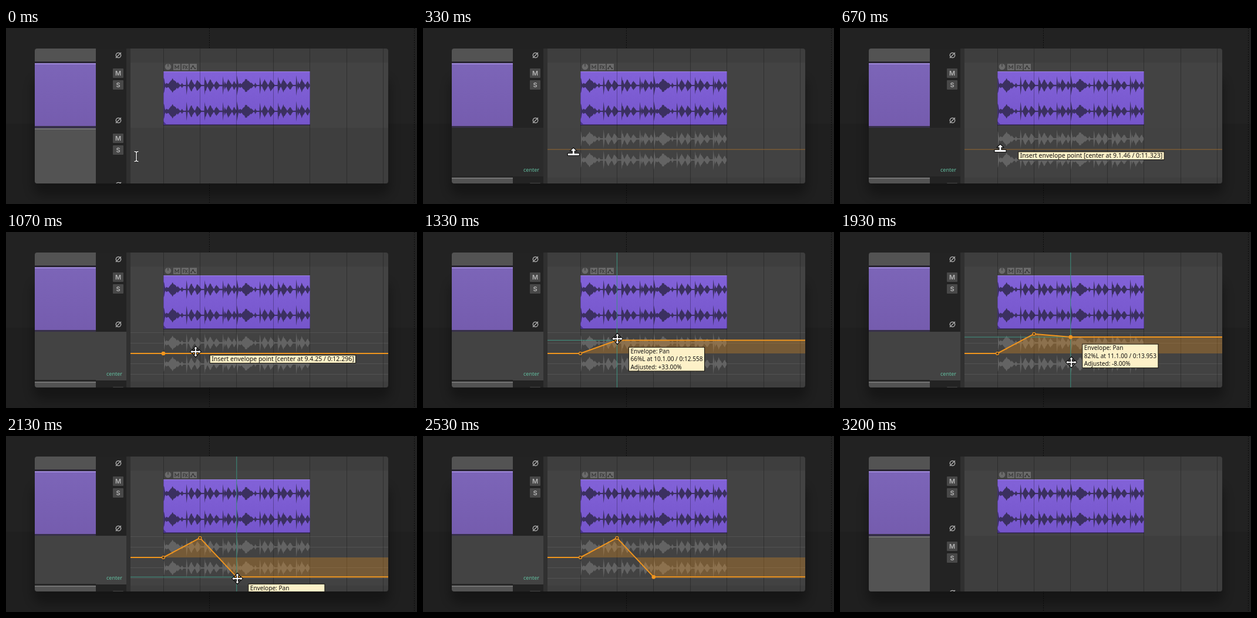
These frames come from a looping animation (700 px wide and 300 px high, 4.53 s). An HTML page:

```html
<!DOCTYPE html>
<html lang="en">
<head>
<meta charset="utf-8">
<title>Pan envelope</title>
<style>
  html, body { margin: 0; width: 100%; height: 100%; overflow: hidden; background: #212121; }
  svg { display: block; width: 100%; height: 100%; }
  text { font-family: "Noto Sans", "Open Sans", sans-serif; }
  .btn text { font: 600 11px Inter, sans-serif; fill: #b4b4b4; text-anchor: middle; }
  .btn rect { fill: #484848; }
  .phase { fill: none; stroke: #b4b4b4; stroke-width: 1.3; }
  .ptr { fill: #fff; stroke: #111; stroke-width: 1.2; stroke-linejoin: round; }
  .snap { stroke: #3f9683; stroke-width: 1; }
  .tip rect { fill: #fdf1c8; stroke: #15130c; }
  .tip text { fill: #111; font-weight: 500; }
</style>
</head>
<body>
<svg viewBox="0 0 700 300" preserveAspectRatio="none">
  <defs>
    <clipPath id="panel"><rect x="49" y="35" width="602" height="230" rx="4"/></clipPath>
    <filter id="blur" x="-20%" y="-20%" width="140%" height="150%"><feGaussianBlur stdDeviation="9"/></filter>
    <linearGradient id="clipFill" x1="0" y1="0" x2="0" y2="1">
      <stop offset="0" stop-color="#8262d8"/><stop offset="1" stop-color="#7555cb"/>
    </linearGradient>
    <linearGradient id="trackFill" x1="0" y1="0" x2="0" y2="1">
      <stop offset="0" stop-color="#7c65b8"/><stop offset="1" stop-color="#755cae"/>
    </linearGradient>
    <g id="phase" class="phase"><circle r="4.2"/><path d="M-4.5 4.5L4.5 -4.5"/></g>
    <g id="buttons" class="btn">
      <rect x="182" y="69" width="18" height="16" rx="1"/><text x="191" y="81">M</text>
      <rect x="182" y="89" width="18" height="16" rx="1"/><text x="191" y="101">S</text>
    </g>
  </defs>

  <rect width="700" height="300" fill="#222"/>
  <rect y="163" width="700" height="137" fill="#1f1f1f"/>
  <path d="M346.5 0V300M695.5 0V300" stroke="#0c0c0c" stroke-dasharray="2 2"/>
  <rect x="46" y="85" width="608" height="200" rx="16" fill="#000" opacity=".3" filter="url(#blur)"/>

  <g clip-path="url(#panel)">
    <rect x="49" y="35" width="163" height="230" fill="#232323"/>
    <rect x="205" y="35" width="7" height="230" fill="#303030"/>
    <rect x="212" y="35" width="439" height="230" fill="#3e3e3e"/>
    <rect x="212" y="59" width="439" height="111" fill="#434343"/>

    <rect x="49" y="35" width="104" height="22" fill="#535353"/>
    <rect x="49" y="57" width="104" height="3" fill="#292532"/>
    <rect x="49" y="60" width="104" height="107" fill="url(#trackFill)"/>
    <rect x="49" y="60" width="104" height="2" fill="#a08adb"/>
    <rect x="49" y="167" width="104" height="4" fill="#37304a"/>
    <use href="#phase" x="191.5" y="46.5"/>
    <use href="#buttons"/>
    <use href="#phase" x="191.5" y="157.5"/>

    <g id="next">
      <rect x="49" y="171" width="104" height="110" fill="#535353"/>
      <rect x="49" y="171" width="104" height="2" fill="#747474"/>
      <use href="#buttons" y="111"/>
      <use href="#phase" x="191.5" y="267.5"/>
    </g>

    <g id="lane">
      <rect id="head" x="49" y="170" width="156" height="83"/>
      <rect x="49" y="252" width="104" height="3" fill="#262626"/>
      <rect x="212" y="170" width="439" height="85" fill="#424242"/>
      <path id="rules" d="M212 171.5H651M212 189.5H651M212 224.5H651M212 242.5H651" stroke="#525252"/>
      <text x="198" y="245" font-size="9" fill="#62bfa0" text-anchor="end">center</text>
    </g>

    <g fill="#6a6a6a">
      <circle cx="276" cy="66" r="5.3"/>
      <path d="M285 61h12v11h-12zM299 61h12v11h-12zM313 61h12v11h-12z"/>
      <g fill="none" stroke="#3a3a3a" stroke-width="1.2">
        <path d="M288 70v-6l3 4 3 -4v6M305 64h-3v6M302 67h2.500M305 64l4 6M309 64l-4 6M315 69l3 -4 4 4"/>
        <path d="M276 66V61"/>
      </g>
      <g fill="#3a3a3a"><circle cx="315.500" cy="69" r="1.300"/><circle cx="318.500" cy="65" r="1.500"/><circle cx="322" cy="69" r="1.300"/></g>
    </g>
    <rect x="268" y="74" width="250" height="91" fill="url(#clipFill)"/>
    <rect x="268" y="74" width="250" height="1" fill="#9b80e6"/>
    <rect x="268" y="164.500" width="250" height="1.500" fill="#2c2344"/>
    <path d="M268 159l6 6h-6z" fill="#4c3690"/>
    <path id="wave" fill="#3b3060"/>
    <path id="ghost" fill="#636363"/>
    <path id="grid" stroke="#000" stroke-opacity=".27"/>

    <g id="env">
      <path id="area" fill="#f0951e" fill-opacity=".29"/>
      <path id="hSnap" class="snap"/>
      <path id="line" fill="none"/>
      <path id="vSnap" class="snap"/>
      <g id="dots" stroke="#f0951e" stroke-width="1.3"><circle/><circle/><circle/></g>
    </g>

    <g id="tip" class="tip"><rect/><text/><text/><text/></g>
    <g id="ptr" class="ptr">
      <path d="M-3.500 -8.500Q0 -8.500 0 -6.500Q0 -8.500 3.500 -8.500M0 -6.500V6.500M-3.500 8.500Q0 8.500 0 6.500Q0 8.500 3.500 8.500" fill="none" stroke-width="3.200"/>
      <path d="M0 -8L6 -2.200H2V1.500H10V5.500H-10V1.500H-2V-2.200H-6Z"/>
      <path id="move"/>
    </g>
  </g>
</svg>
<script>
const $ = id => document.getElementById(id);
const LOOP = 4530, TICK = 1000 / 15;
const LEFT = 212, RIGHT = 651, MID = 207, BEAT = 15.6, BPM = 172;
const barX = n => 268 + n * 4 * BEAT;
const panY = v => MID - v * 0.34;

// [tick, x, y]
const PATH = [
  [0, 222, 219], [4, 249, 214], [8, 278, 206], [9, 275.2, 206], [10, 273, 206],
  [12, 269, 206], [13, 269, 206], [15, 318.7, 205], [16, 323, 204], [17, 331, 204],
  [18, 331, 198], [21, 331, 174], [22, 331, 171], [24, 368.71, 168], [25, 368, 168],
  [27, 391, 172], [28, 393, 180], [29, 394, 222], [30, 394, 240], [32, 394, 243],
  [35, 420, 252], [38, 450, 285]
];
const SHAPES = [[0, 0], [5, 1], [12, 2], [13, 1], [15, 2], [23, 1], [27, 2], [33, 1], [38, -1]];
// Each drag: first tick, then the pan value per tick (left is positive).
const DRAGS = [
  { from: 12, pan: [0] },
  { from: 17, pan: [0, 10, 36, 66, 89, 98], base: 0 },
  { from: 28, pan: [98, 82, -35, -88, -98], base: 98 }
];
const within = (k, a, b) => k >= a && k < b;
const show = (el, on) => el.setAttribute('visibility', on ? 'visible' : 'hidden');
function set(el, attrs) { for (const a in attrs) el.setAttribute(a, attrs[a]); }

function pointerAt(k) {
  const i = PATH.findIndex(p => p[0] >= k);
  if (i < 0) return PATH[PATH.length - 1].slice(1);
  if (i === 0) return PATH[0].slice(1);
  const [a, ax, ay] = PATH[i - 1], [b, bx, by] = PATH[i];
  const u = (k - a) / (b - a);
  return [ax + (bx - ax) * u, ay + (by - ay) * u];
}

function place(x) {
  const beats = 32 + (x - barX(0)) / BEAT;
  const h = Math.round(beats * 100), b = Math.floor(h / 100);
  const ms = Math.floor(beats * 60000 / BPM + 1e-6);
  const pad = (n, w) => String(n).padStart(w, '0');
  return `${Math.floor(b / 4) + 1}.${b % 4 + 1}.${pad(h % 100, 2)} / 0:${pad(Math.floor(ms / 1000), 2)}.${pad(ms % 1000, 3)}`;
}
const panName = v => v ? Math.abs(v) + '%' + (v > 0 ? 'L' : 'R') : 'center';

// Two-bar drum loop: [offset, height, attack, decay]
const HITS = [
  [0, 17, 1, 3], [5, 5, 4, 6], [15, 13, 9, 12], [24, 6, 3, 5], [31, 5, 2, 3], [39, 18, 1, 2],
  [47, 12, 5, 6], [57, 11, 4, 8], [70, 18, 1, 2], [72, 9, 1, 3], [79, 12, 5, 7], [90, 9, 5, 6],
  [101, 19, 1, 2], [104, 9, 1, 3], [110, 12, 4, 7], [120, 8, 4, 5]
];
function waveform(centres) {
  let seed = 7;
  const rnd = () => (seed = seed * 16807 % 2147483647) / 2147483647;
  const amps = Array.from({ length: 250 }, (_, i) => {
    const x = i % 125;
    let h = 1.2;
    for (const [at, top, up, down] of HITS) {
      const d = x - at;
      h = Math.max(h, top * (1 - (d < 0 ? -d / up : d / down)));
    }
    return h * (0.78 + 0.22 * rnd());
  });
  return centres.map(c => {
    const side = s => amps.map((h, i) => `${268.5 + i} ${(c + s * h).toFixed(1)}`);
    return 'M' + side(-1).concat(side(1).reverse()).join('L') + 'Z';
  }).join('');
}

function drawTip(x, y, lines, size) {
  const [box, ...rows] = $('tip').children;
  let w = 0;
  rows.forEach((row, i) => {
    row.textContent = lines[i] || '';
    set(row, { x: x + 3, y: y + 10.3 + i * 13.5, 'font-size': size });
    if (lines[i]) w = Math.max(w, row.getComputedTextLength());
  });
  set(box, { x, y, width: w + 6, height: lines.length * 13.5 });
}

function render(time) {
  const k = Math.floor((time % LOOP + 4) / TICK);
  const lane = within(k, 4, 48), active = k >= 12;
  show($('lane'), lane);
  show($('ghost'), lane);
  show($('env'), lane);
  show($('rules'), lane && active);
  set($('head'), { fill: active ? '#434343' : '#2b2b2b' });
  set($('next'), { transform: `translate(0 ${lane ? 84 : 0})` });

  const pans = DRAGS.filter(d => k >= d.from).map(d => d.pan[Math.min(k - d.from, d.pan.length - 1)]);
  const last = pans.length - 1, pan = pans[last] || 0, y = panY(pan);
  const pts = pans.map((v, i) => `L${barX(i)} ${panY(v)}`).join('');
  const curve = `M${LEFT} ${MID}${pts}L${RIGHT} ${y}`;
  set($('line'), { d: curve, stroke: active ? '#f0951e' : '#94672f', 'stroke-width': active ? 2 : 1 });
  set($('area'), { d: `${curve}V${MID}Z` });
  [...$('dots').children].forEach((dot, i) => {
    show(dot, lane && i <= last);
    if (i > last) return;
    set(dot, { cx: barX(i), cy: panY(pans[i]), r: i === last ? 2.7 : 2.4, fill: i === last ? '#f0951e' : '#3b3128' });
  });

  const drag = DRAGS[last];
  const dragging = last > 0 && k < drag.from + drag.pan.length;
  const px = barX(last);
  show($('hSnap'), dragging);
  show($('vSnap'), dragging);
  if (dragging) {
    set($('hSnap'), { d: `M${LEFT} ${y}H${RIGHT}` });
    set($('vSnap'), { d: `M${px} 35V265` });
  }

  const hover = within(k, 9, 17) || within(k, 23, 28);
  show($('tip'), hover || dragging);
  if (dragging) {
    const adj = (pan - drag.base) / 2;
    drawTip(px + 20, y + 12, ['Envelope: Pan', `${panName(pan)} at ${place(px)}`,
      `Adjusted: ${adj > 0 ? '+' : ''}${adj.toFixed(2)}%`], 10.1);
  } else if (hover) {
    // The hint trails the pointer by one tick.
    const [hx, hy] = pointerAt(k - 1);
    drawTip(hx + 28.5, hy + 5, [`Insert envelope point [${panName(pan)} at ${place(hx)}]`], 10.5);
  }

  const shape = SHAPES.filter(s => s[0] <= k).pop()[1];
  const [cx, cy] = pointerAt(k);
  set($('ptr'), { transform: `translate(${cx} ${cy})` });
  [...$('ptr').children].forEach((el, i) => show(el, i === shape));
  show(beam, shape === 0);
}

const beam = $('ptr').firstElementChild.cloneNode();
set(beam, { style: 'stroke:#fff;stroke-width:1.4' });
$('ptr').parentNode.append(beam);
set(beam, { transform: 'translate(222 219)' });

const arm = [[-1.5, -1.5], [-1.5, -5], [-4, -5], [0, -9.5], [4, -5], [1.5, -5]];
const turns = [[1, 0, 0, 1], [0, -1, 1, 0], [-1, 0, 0, -1], [0, 1, -1, 0]];
$('move').setAttribute('d', 'M' + turns.flatMap(([a, b, c, d]) =>
  arm.map(([x, y]) => `${a * x + b * y} ${c * x + d * y}`)).join('L') + 'Z');
$('wave').setAttribute('d', waveform([98, 142]));
$('ghost').setAttribute('d', waveform([189, 225]));
$('grid').setAttribute('d', [0, 1, 2, 3, 4, 5, 6].map(n => `M${Math.floor(barX(n)) + 0.5} 35V265`).join(''));

const start = performance.now();
function loop() {
  const t = performance.now() - start;
  const [x, y] = pointerAt(Math.floor((t % LOOP + 4) / TICK));
  set(beam, { transform: `translate(${x} ${y})` });
  render(t);
  requestAnimationFrame(loop);
}
loop();
</script>
</body>
</html>
```
